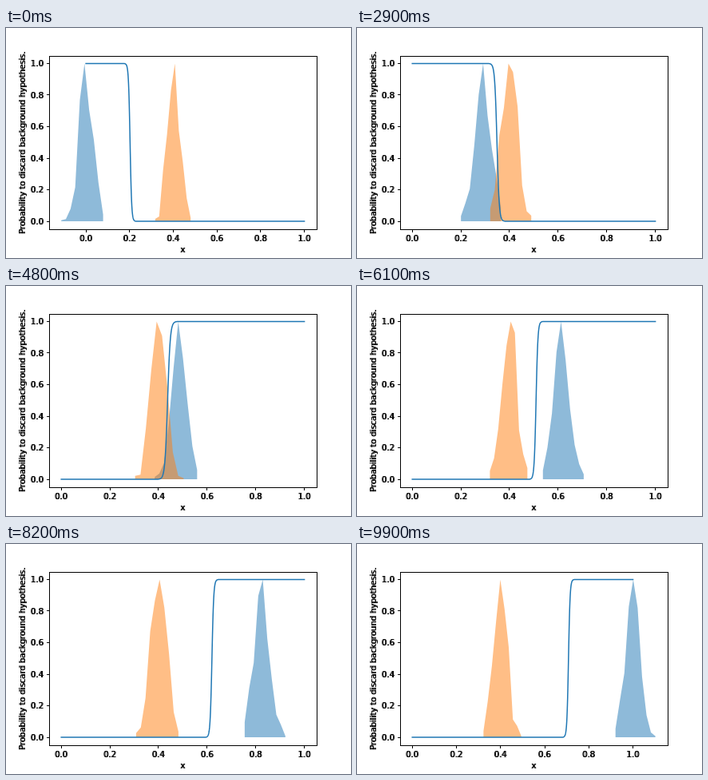
Recreate the animation shown at these times as an HTML page with a canvas. Size 432 by 288 pixels, loop 10 s.

```html
<!DOCTYPE html>
<html lang="en">
<head>
<meta charset="utf-8">
<title>Background hypothesis test</title>
<style>
html, body { margin: 0; width: 100%; height: 100%; overflow: hidden; background: #fff; }
canvas { display: block; }
</style>
</head>
<body>
<canvas id="plot" width="432" height="288"></canvas>
<script>
const ctx = document.getElementById('plot').getContext('2d');
const STEP = 100, COUNT = 100;
const BINS = 10, SAMPLES = 500, SIGMA = 0.0315, SIGNAL = 0.4;
const BOX = { l: 54.5, t: 35.5, r: 389.5, b: 252.5 };
const PLOT = { l: 69.2, r: 373.6, zero: 242.1, one: 44.4 };

function random(seed) {
  let s = seed;
  return () => {
    s = (s + 0x6d2b79f5) | 0;
    let v = Math.imul(s ^ (s >>> 15), s | 1);
    v ^= v + Math.imul(v ^ (v >>> 7), v | 61);
    return ((v ^ (v >>> 14)) >>> 0) / 4294967296;
  };
}

// Histogram of normal samples: centres of the outer bins, heights with a peak of one
function histogram(mean, rnd) {
  const xs = Array.from({ length: SAMPLES }, () =>
    mean + SIGMA * Math.sqrt(-2 * Math.log(1 - rnd())) * Math.cos(2 * Math.PI * rnd()));
  const min = Math.min(...xs), width = (Math.max(...xs) - min) / BINS;
  const counts = new Array(BINS).fill(0);
  for (const x of xs) counts[Math.min(BINS - 1, Math.floor((x - min) / width))]++;
  const peak = Math.max(...counts);
  return {
    lo: min + width / 2,
    hi: min + width * (BINS - 0.5),
    heights: counts.map(c => c / peak)
  };
}

const rnd = random(7);
const steps = Array.from({ length: COUNT }, (_, i) => {
  const mean = i / (COUNT - 1);
  return { mean, background: histogram(mean, rnd), signal: histogram(SIGNAL, rnd) };
});

const yPos = v => PLOT.zero + (PLOT.one - PLOT.zero) * v;

function drawBins({ lo, hi, heights }, xPos, color) {
  ctx.beginPath();
  ctx.moveTo(xPos(lo), PLOT.zero);
  heights.forEach((h, k) => ctx.lineTo(xPos(lo + (hi - lo) * k / (BINS - 1)), yPos(h)));
  ctx.lineTo(xPos(hi), PLOT.zero);
  ctx.closePath();
  ctx.fillStyle = color;
  ctx.fill();
}

// Logistic step between the two means, blurred as they meet
function drawCurve(mean, xPos) {
  const gap = Math.abs(mean - SIGNAL);
  const rising = mean > SIGNAL;
  const shift = rising ? -0.005 + 0.0066 * Math.log(Math.max(gap, 0.05) / 0.085) : 0.002;
  const mid = (mean + SIGNAL) / 2 + shift;
  const scale = (0.0036 + 4e-6 / Math.pow(gap, 2.5)) * (rising ? 1 : -1);
  ctx.beginPath();
  for (let k = 0; k <= 1000; k++) {
    const x = k / 1000;
    ctx.lineTo(xPos(x), yPos(1 / (1 + Math.exp((mid - x) / scale))));
  }
  ctx.strokeStyle = '#1f77b4';
  ctx.lineWidth = 1.5;
  ctx.lineCap = 'square';
  ctx.lineJoin = 'round';
  ctx.stroke();
}

function line(x1, y1, x2, y2) {
  ctx.beginPath();
  ctx.moveTo(x1, y1);
  ctx.lineTo(x2, y2);
  ctx.stroke();
}

// Two passes side by side give the heavy text
function label(text, x, y, align) {
  ctx.textAlign = align;
  ctx.fillText(text, x - 0.5, y);
  ctx.fillText(text, x + 0.5, y);
}

function drawAxes(xPos) {
  ctx.strokeStyle = ctx.fillStyle = '#000';
  ctx.lineWidth = 1;
  ctx.lineCap = 'butt';
  ctx.lineJoin = 'miter';
  ctx.font = '10px "DejaVu Sans", sans-serif';
  ctx.textBaseline = 'alphabetic';
  ctx.strokeRect(BOX.l, BOX.t, BOX.r - BOX.l, BOX.b - BOX.t);
  for (let k = 0; k <= 5; k++) {
    const v = k / 5, text = v.toFixed(1);
    const x = Math.floor(xPos(v)) + 0.5, y = Math.floor(yPos(v)) + 0.5;
    line(x, BOX.b, x, BOX.b + 3.5);
    line(BOX.l, y, BOX.l - 3.5, y);
    label(text, xPos(v), 267, 'center');
    label(text, 47, Math.round(yPos(v) + 3.8), 'right');
  }
  label('x', 221.5, 281, 'center');
  ctx.save();
  ctx.translate(23.5, 143.5);
  ctx.rotate(-Math.PI / 2);
  label('Probability to discard background hypothesis.', 0, 0, 'center');
  ctx.restore();
}

function draw({ mean, background, signal }) {
  const min = Math.min(0, background.lo), max = Math.max(1, background.hi);
  const xPos = v => PLOT.l + (PLOT.r - PLOT.l) * (v - min) / (max - min);
  ctx.fillStyle = '#fff';
  ctx.fillRect(0, 0, 432, 288);
  drawBins(background, xPos, 'rgba(31, 119, 180, 0.5)');
  drawBins(signal, xPos, 'rgba(255, 127, 14, 0.5)');
  drawCurve(mean, xPos);
  drawAxes(xPos);
}

const start = performance.now();
function tick() {
  const t = Math.max(0, performance.now() - start);
  draw(steps[Math.floor(t / STEP) % COUNT]);
  requestAnimationFrame(tick);
}
tick();
</script>
</body>
</html>
```
